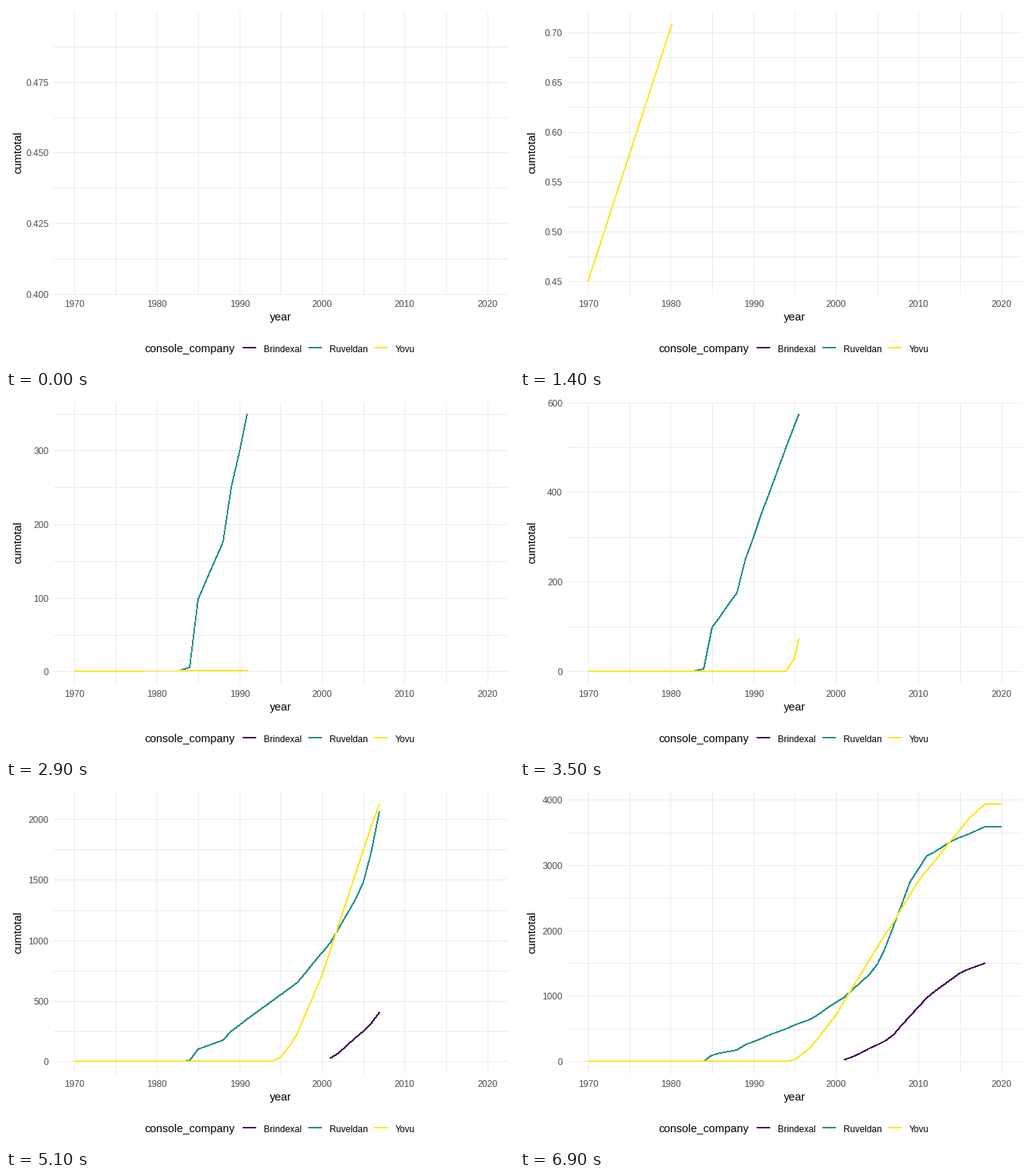
Recreate the animation shown at these times as a matplotlib script. Size 672 by 480 pixels, loop 10 s.

```python
import math

import matplotlib.pyplot as plt
import numpy as np
from matplotlib.animation import FuncAnimation
from matplotlib.collections import LineCollection

W, H, DPI = 672, 480, 100
LEFT, RIGHT, TOP, BOTTOM = 63, 664.4, 7.33, 382.55
FRAMES, LAST = 100, 69            # reveal ends at LAST, then holds
GRID, AXIS_TEXT = "#EBEBEB", "#4D4D4D"

plt.rcParams["font.family"] = "Liberation Sans"

# name, colour, (year, running total) wherever the yearly rate changes
SERIES = [
    ("Brindexal", "#440154",
     [(2001, 28), (2002, 72), (2006, 312), (2007, 408), (2011, 975),
      (2015, 1354), (2018, 1500)]),
    ("Ruveldan", "#21908C",
     [(1983, 2), (1984, 6), (1985, 98), (1988, 176), (1989, 250),
      (1997, 649), (2001, 982), (2004, 1332), (2005, 1485), (2006, 1728),
      (2009, 2740), (2011, 3134), (2014, 3366), (2018, 3588), (2020, 3589)]),
    ("Yovu", "#FDE725",
     [(1970, 0.45), (1994, 1.06), (1995, 29), (1996, 116), (1997, 223),
      (2000, 709), (2005, 1755), (2007, 2127), (2010, 2755), (2016, 3703),
      (2018, 3932), (2020, 3935)]),
]


def pt(px):
    return px * 72 / DPI


def x_px(year):
    return LEFT + (np.asarray(year) - 1967.5) / 55 * (RIGHT - LEFT)


def y_px(v, lo, hi):
    return BOTTOM - (np.asarray(v) - lo) / (hi - lo) * (BOTTOM - TOP)


def yearly(knots):
    """One value a year, with the first stretch left as a single segment."""
    at, totals = zip(*knots)
    years = [at[0], *range(at[1], at[-1] + 1)]
    return years, list(np.interp(years, at, totals))


def reveal(years, totals, frame):
    """Points passed so far plus the moving tip."""
    keys = [round(LAST * (y - 1970) / 50) for y in years]
    n = sum(k <= frame for k in keys)
    xs, ys = years[:n], totals[:n]
    if 0 < n < len(keys):
        xs = xs + [np.interp(frame, keys, years)]
        ys = ys + [np.interp(frame, keys, totals)]
    return xs, ys


def pretty(lo, hi, m=5):
    """Axis breaks by Talbot's extended labelling; returns breaks and step."""
    best, found, size = -math.inf, [], 1
    rng = hi - lo
    for j in (1, 2):
        for i, q in enumerate([1, 5, 2, 2.5, 4, 3]):
            for k in range(2, 13):
                z0 = math.ceil(math.log10(rng / (k + 1) / j / q))
                for z in (z0, z0 + 1):
                    step = j * q * 10.0 ** z
                    first = (math.floor(hi / step) - k + 1) * j
                    for s in range(first, math.ceil(lo / step) * j + 1):
                        a = s * step / j
                        b = a + step * (k - 1)
                        zero = s % j == 0 and a <= 0 <= b
                        simple = 1 - i / 5 - j + zero
                        cover = 1 - 0.5 * ((hi - b) ** 2 + (lo - a) ** 2) / (0.1 * rng) ** 2
                        r = (k - 1) / (b - a)
                        rt = (m - 1) / (max(b, hi) - min(a, lo))
                        dense = 2 - max(r / rt, rt / r)
                        score = 0.25 * simple + 0.2 * cover + 0.5 * dense
                        if score > best + 1e-12:
                            best, size = score, step
                            found = [a + n * step for n in range(k)]
    return found, size


def decimals(values):
    return next(d for d in range(9)
                if d == 8 or all(abs(v - round(v, d)) < 1e-9 for v in values))


fig = plt.figure(figsize=(W / DPI, H / DPI), dpi=DPI, facecolor="white")
ax = fig.add_axes([0, 0, 1, 1])
ax.set_xlim(0, W)
ax.set_ylim(H, 0)
ax.axis("off")


def label(x, y, text, px, color="black", ha="left", **kw):
    return ax.text(x, y, text, fontsize=pt(px), color=color, ha=ha,
                   va="baseline", **kw)


def stroke(xs, ys, color, z):
    # without antialiasing every touched pixel is filled: two pixels in all
    return ax.plot(xs, ys, color=color, lw=pt(0.8), antialiased=False,
                   snap=False, zorder=z, solid_capstyle="butt",
                   solid_joinstyle="round")[0]


def grid_lines(segments):
    lines = LineCollection(segments, colors=GRID, linewidths=pt(1), zorder=1)
    lines.set_snap(False)
    return ax.add_collection(lines, autolim=False)


columns = [math.floor(x_px(y)) + 0.5 for y in range(1970, 2021, 5)]
grid_lines([[(x, 8), (x, 382)] for x in columns])
rows = grid_lines([])

for year in range(1970, 2021, 10):
    label(math.floor(x_px(year)), 399, str(year), 12, AXIS_TEXT, "center")
label(363.5, 417.5, "year", 14.8, ha="center")
label(20, 193.5, "cumtotal", 14.8, ha="center", rotation=90,
      rotation_mode="anchor")
label(183.7, 459.5, "console_company", 14.8)

lines, data = [], []
for i, (name, color, knots) in enumerate(SERIES):
    x = 313 + 87 * i
    stroke([x, x + 18], [453, 453], color, 2)
    label(x + 27.6, 459, name, 12)
    lines.append(stroke([], [], color, 3 + i))
    data.append(yearly(knots))

ticks = [label(56.3, 0, "", 12, AXIS_TEXT, "right") for _ in range(13)]


def draw(i):
    frame = min(i, LAST)
    paths = [reveal(years, totals, frame) for years, totals in data]
    seen = [v for _, ys in paths for v in ys]
    pad = 0.05 * (max(seen) - min(seen)) or 0.05
    lo, hi = min(seen) - pad, max(seen) + pad

    for line, (xs, ys) in zip(lines, paths):
        line.set_data(np.floor(x_px(xs)), np.floor(y_px(ys, lo, hi)))

    def inside(values):
        return [v for v in values if lo - 1e-9 <= v < hi - 1e-9]

    def row(v):
        return math.floor(y_px(v, lo, hi) + 1e-6)

    breaks, step = pretty(lo, hi)
    minor = [breaks[0] - step / 2] + [b + step / 2 for b in breaks]
    rows.set_segments([[(63, row(v) + 0.5), (664, row(v) + 0.5)]
                       for v in inside(breaks + minor)])

    shown = inside(breaks)
    d = decimals(shown)
    for tick in ticks:
        tick.set_text("")
    for tick, v in zip(ticks, shown):
        tick.set_text(f"{v + 0.0:.{d}f}")
        tick.set_y(row(v) + 5)
    return [*lines, rows, *ticks]


anim = FuncAnimation(fig, draw, frames=FRAMES, interval=100, repeat=True,
                     repeat_delay=0, blit=False)
plt.show()
```
